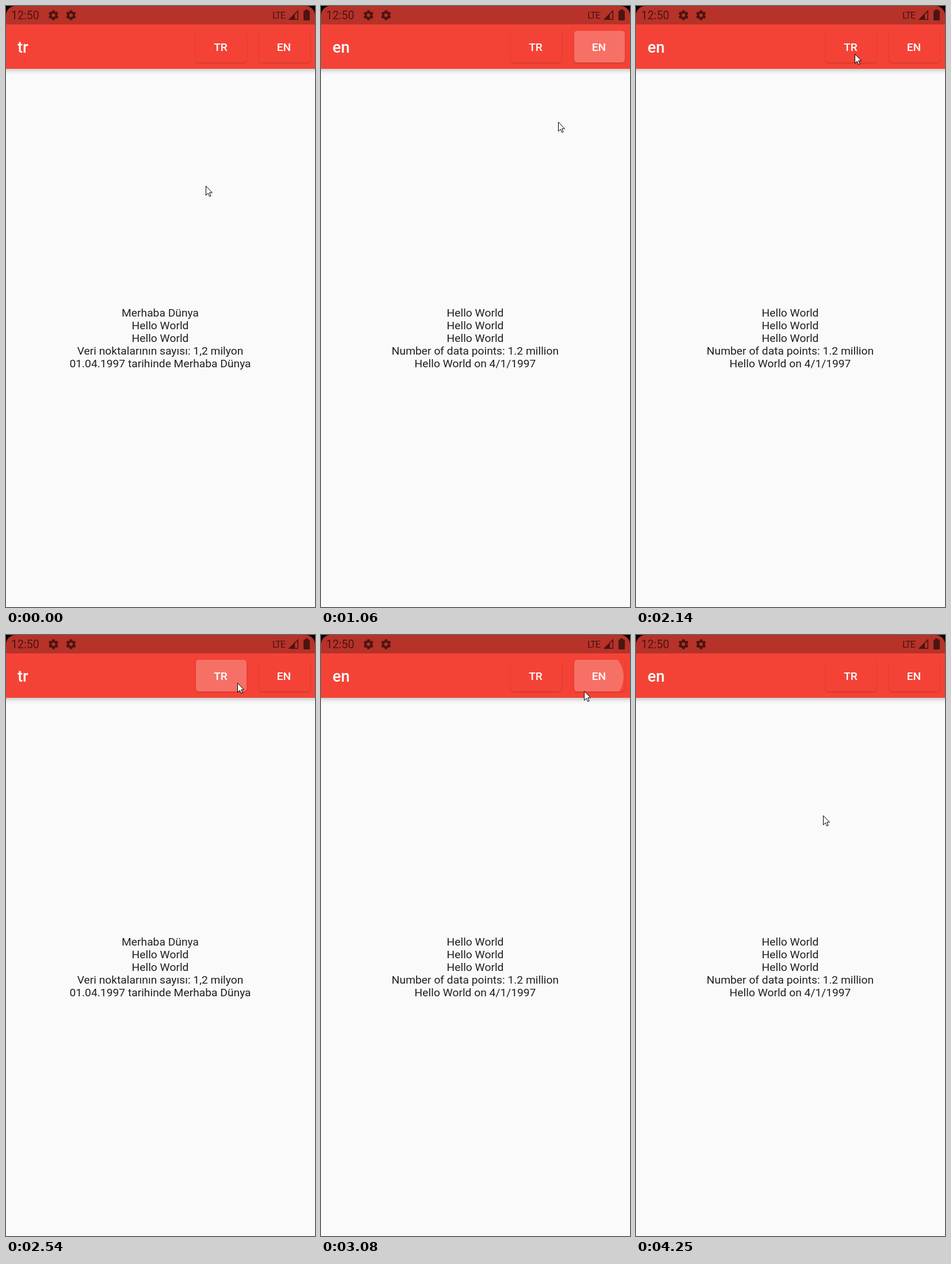
These frames come from a looping animation (537 px wide and 1043 px high, 4.33 s). An HTML page with a canvas:

```html
<!DOCTYPE html>
<html lang="en">
<head>
<meta charset="utf-8">
<title>Language switch</title>
<style>
  html, body { margin: 0; width: 100%; height: 100%; overflow: hidden; background: #fafafa; }
  canvas { display: block; }
</style>
</head>
<body>
<canvas id="stage" width="537" height="1043"></canvas>
<script>
const ctx = document.getElementById('stage').getContext('2d');
const W = 537, H = 1043;
const LOOP = 4330, TICKS = 56, STEP = LOOP / TICKS, LEAD = 32;
const RED = '#f44336', ICON = '#4b1511';

const TEXT = {
  tr: ['Merhaba Dünya', 'Hello World', 'Hello World',
       'Veri noktalarının sayısı: 1,2 milyon', '01.04.1997 tarihinde Merhaba Dünya'],
  en: ['Hello World', 'Hello World', 'Hello World',
       'Number of data points: 1.2 million', 'Hello World on 4/1/1997']
};
const BUTTONS = { tr: 330, en: 440 };
const BTN = { y: 43, w: 88, h: 55, r: 5 };

const TAPS = [{ at: 925, lang: 'en' }, { at: 2300, lang: 'tr' }, { at: 2982, lang: 'en' }];
const SWITCH = 60, GROW = 225, HOLD = 275, FADE = 150;

// Pointer stops: [tick, x, y]
const STOPS = [
  [0, 347, 312], [7, 479, 73], [12, 467, 70], [14, 412, 201], [18, 379, 221],
  [20, 379, 150], [25, 366, 83], [33, 402, 83], [36, 461, 82], [39, 460, 78],
  [40, 457, 97], [44, 335, 308], [49, 331, 315], [55, 325, 313]
];

const clamp = v => Math.max(0, Math.min(1, v));
const mix = (a, b, p) => a + (b - a) * p;
const easeOut = p => 1 - (1 - clamp(p)) ** 2;

function pointerAt(t) {
  const tick = t / STEP;
  const i = Math.max(1, STOPS.findIndex(stop => stop[0] >= tick));
  const [t0, x0, y0] = STOPS[i - 1], [t1, x1, y1] = STOPS[i];
  const p = (tick - t0) / (t1 - t0);
  return { x: mix(x0, x1, p), y: mix(y0, y1, p) };
}

function text(str, x, y, size, color, weight = 400, align = 'left', spacing = 0) {
  ctx.font = `${weight} ${size}px Roboto, sans-serif`;
  ctx.fillStyle = color;
  ctx.textAlign = align;
  ctx.letterSpacing = spacing + 'px';
  ctx.fillText(str, x, y);
}

function polygon(...points) {
  ctx.beginPath();
  points.forEach(([x, y]) => ctx.lineTo(x, y));
  ctx.closePath();
}

function shadowed(blur, dy, alpha, paint) {
  ctx.save();
  ctx.shadowColor = `rgba(0,0,0,${alpha})`;
  ctx.shadowBlur = blur;
  ctx.shadowOffsetY = dy;
  paint();
  ctx.restore();
}

function gear(cx, cy) {
  ctx.save();
  ctx.translate(cx, cy);
  ctx.fillStyle = ICON;
  for (let i = 0; i < 6; i++) {
    polygon([-3, -5], [-2, -8.6], [2, -8.6], [3, -5]);
    ctx.fill();
    ctx.rotate(Math.PI / 3);
  }
  ctx.beginPath();
  ctx.arc(0, 0, 6.6, 0, 7);
  ctx.moveTo(3, 0);
  ctx.arc(0, 0, 3, 0, 7);
  ctx.fill('evenodd');
  ctx.restore();
}

function signal(x, y, size) {
  ctx.strokeStyle = ctx.fillStyle = ICON;
  ctx.lineWidth = 1.6;
  polygon([x, y], [x + size, y], [x + size, y - size]);
  ctx.stroke();
  const part = size * 0.65;
  polygon([x, y], [x + part, y], [x + part, y - part]);
  ctx.fill();
}

function battery(x, y) {
  ctx.fillStyle = ICON;
  ctx.fillRect(x + 3, y, 5, 3);
  ctx.beginPath();
  ctx.roundRect(x, y + 2, 11, 17, 1.5);
  ctx.fill();
}

function statusBar() {
  ctx.fillStyle = '#b73229';
  ctx.fillRect(0, 0, W, 32);
  text('12:50', 9, 23, 19.6, ICON);
  gear(82.5, 16);
  gear(113, 16);
  text('LTE', 463, 22, 16.2, ICON, 400, 'left', -1.2);
  signal(492.5, 23.2, 14.7);
  battery(517, 6);
}

function displayCorners(r) {
  ctx.fillStyle = '#000';
  ctx.beginPath();
  ctx.rect(0, 0, W, H);
  ctx.roundRect(0, 0, W, H, [r, r, 0, 0]);
  ctx.fill('evenodd');
}

function buttonPath(x) {
  ctx.beginPath();
  ctx.roundRect(x, BTN.y, BTN.w, BTN.h, BTN.r);
}

function ripple(tap, t) {
  const age = t - tap.at;
  if (age < 0 || age > HOLD + FADE) return;
  const grow = easeOut(age / GROW);
  const alpha = 0.24 * clamp((HOLD + FADE - age) / FADE);
  const left = BUTTONS[tap.lang], touch = pointerAt(tap.at);
  const x = mix(touch.x, left + BTN.w / 2, grow);
  const y = mix(touch.y, BTN.y + BTN.h / 2, grow);
  ctx.save();
  buttonPath(left);
  ctx.clip();
  ctx.fillStyle = `rgba(255,255,255,${alpha})`;
  ctx.beginPath();
  ctx.arc(x, y, mix(16, 59, grow), 0, 7);
  ctx.fill();
  ctx.restore();
}

function appBar(lang, t) {
  ctx.fillStyle = RED;
  shadowed(8, 2, 0.27, () => ctx.fillRect(-20, 20, W + 40, 89));
  text(lang, 20, 81, 27.3, '#fff', 500);
  for (const [name, x] of Object.entries(BUTTONS)) {
    ctx.fillStyle = RED;
    buttonPath(x);
    shadowed(3, 1, 0.22, () => ctx.fill());
    TAPS.filter(tap => tap.lang === name).forEach(tap => ripple(tap, t));
    text(name.toUpperCase(), x + 43, 78, 19.2, '#fff', 500, 'center');
  }
}

function pointer({ x, y }) {
  ctx.save();
  ctx.translate(Math.round(x) + 0.5, Math.round(y) + 0.5);
  polygon([0, 0], [0, 16], [3.7, 12.4], [6.2, 18], [8.6, 17], [6.2, 11.4], [11, 11.4]);
  ctx.fillStyle = '#fff';
  ctx.strokeStyle = '#000';
  ctx.lineWidth = 1;
  ctx.fill();
  ctx.stroke();
  ctx.restore();
}

function draw(now) {
  // The screen refreshes in even steps
  const tick = Math.min(TICKS - 1, Math.floor((now % LOOP + LEAD) / STEP));
  const t = tick * STEP;
  const lang = TAPS.reduce((cur, tap) => t >= tap.at + SWITCH ? tap.lang : cur, 'tr');

  ctx.fillStyle = '#fafafa';
  ctx.fillRect(0, 0, W, H);
  appBar(lang, t);
  statusBar();
  displayCorners(16);
  TEXT[lang].forEach((line, i) => text(line, 268, 539 + i * 22, 19.25, '#202020', 400, 'center'));
  pointer(pointerAt(t));
}

const start = performance.now();
function frame() {
  draw(performance.now() - start);
  requestAnimationFrame(frame);
}
frame();
</script>
</body>
</html>
```
